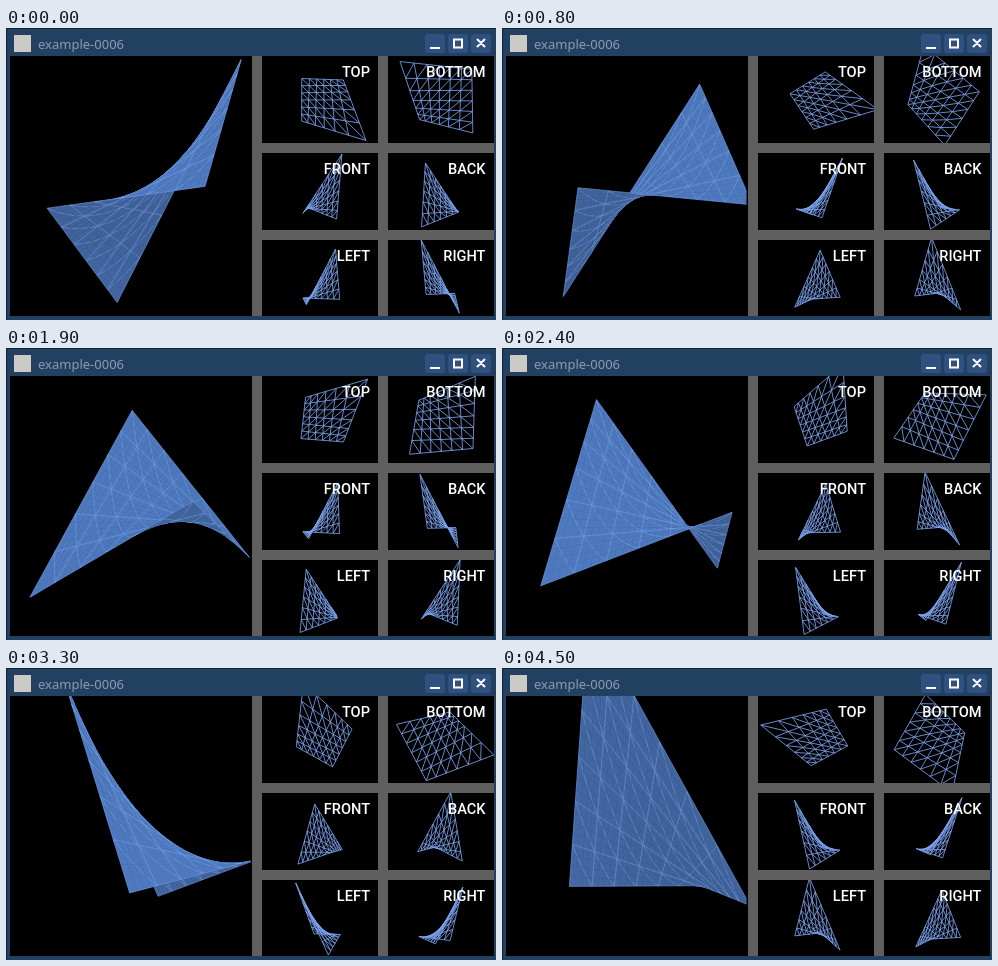
Recreate the animation shown at these times as an HTML page with a canvas. Size 490 by 292 pixels, loop 4.6 s.

```html
<!DOCTYPE html>
<html lang="en">
<head>
<meta charset="utf-8">
<title>example-0006</title>
<style>
  html, body { margin: 0; width: 100%; height: 100%; overflow: hidden; background: #000; }
  canvas, svg { position: absolute; left: 0; top: 0; width: 490px; height: 292px; }
  .title { font: 13px "Noto Sans", sans-serif; fill: #8d9bb1; }
  .labels { font: 500 14.6px Roboto, sans-serif; fill: #fff; text-anchor: end; }
  .sign { fill: none; stroke: #fff; stroke-width: 2; }
</style>
</head>
<body>
<canvas id="stage" width="490" height="292"></canvas>
<svg viewBox="0 0 490 292">
  <path fill="#5f5f5f" d="M246 28h10v260h-10zM372 28h10v260h-10zM256 115h232v10h-232zM256 202h232v10h-232z"/>
  <path fill="#22405f" d="M0 0h490v28h-490zM0 28h4v264h-4zM488 28h2v264h-2zM0 288h490v4h-490z"/>
  <path fill="#10233a" d="M0 0h490v1h-490zM0 0h1v292h-1z"/>
  <rect x="8" y="7" width="17" height="17" fill="#cbcac6"/>
  <text class="title" x="32" y="21">example-0006</text>
  <g fill="#30517f">
    <rect x="419" y="6" width="20" height="19" rx="3"/>
    <rect x="442" y="6" width="20" height="19" rx="3"/>
    <rect x="465" y="6" width="20" height="19" rx="3"/>
  </g>
  <path class="sign" d="M424 20h10M448 11.5h8v8h-8zM471 11l8 8M479 11l-8 8"/>
  <g class="labels">
    <text x="364" y="49">TOP</text><text x="479.5" y="49">BOTTOM</text>
    <text x="364" y="146">FRONT</text><text x="479.5" y="146">BACK</text>
    <text x="364" y="233">LEFT</text><text x="479.5" y="233">RIGHT</text>
  </g>
</svg>
<script>
const LOOP = 4600, STEP = 100, CELLS = 6, FINE = 4;
const ctx = document.getElementById('stage').getContext('2d');
const rad = deg => deg * Math.PI / 180;

// Turn of the sheet: time in ms, angle in degrees
const TURN = [[0, 44], [400, 28], [1300, -12], [2400, -66.5], [3300, -109], [4100, -146], [4500, -166.5]];

// box: clip; c: centre; az, el: camera direction; f: focal length; d: distance
const side = (x, y, w, cx, cy, az) =>
  ({ box: [x, y, w, 77], c: [cx, cy], az, el: 0, f: 128, d: 5.5 });
const MAIN = { box: [4, 28, 240.5, 260], c: [147, 159], az: -66, el: -23.6, f: 458, d: 4.31, lift: 0.42, roll: 0.04 };
const SMALL = [
  { box: [256, 28, 116, 87], c: [317, 71], az: 0, el: 90, f: 148, d: 4 },
  { box: [382, 28, 106, 87], c: [434.5, 71.5], az: 180, el: -90, f: 148, d: 4 },
  side(256, 125, 116, 315.5, 163.5, 0),
  side(382, 125, 106, 435, 163.5, 180),
  side(256, 212, 116, 314.5, 249.5, -90),
  side(382, 212, 106, 435, 249.5, 90)
];

function angleAt(t) {
  let i = 1;
  while (i < TURN.length - 1 && t > TURN[i][0]) i++;
  const [t0, a0] = TURN[i - 1], [t1, a1] = TURN[i];
  return a0 + (a1 - a0) * (t - t0) / (t1 - t0);
}

// Bilinear sheet, one corner raised, pivot slightly off centre
const mix = (u, v, a, b, c, d) =>
  a * u * v + b * u * (1 - v) + c * (1 - u) * (1 - v) + d * (1 - u) * v;
const sheet = (u, v) => [
  mix(u, v, 1.055, 0.05, -0.95, 0),
  v - u,
  mix(u, v, 1.39, -1.33, -0.77, -0.82)
];

function camera(view, turn) {
  const a = rad(turn + view.az), e = rad(view.el);
  const ca = Math.cos(a), sa = Math.sin(a), ce = Math.cos(e), se = Math.sin(e);
  return (u, v) => {
    const [x, y, h] = sheet(u, v), z = h + (view.lift || 0);
    const s = x * sa + y * ca;
    const px = x * ca - y * sa, up = z * ce - s * se, near = s * ce + z * se;
    const k = view.f / (view.d - near);
    return {
      p: [px, up, near],
      x: view.c[0] + k * (px + (view.roll || 0) * up),
      y: view.c[1] - k * up
    };
  };
}

function clipped(view, draw) {
  ctx.save();
  ctx.beginPath();
  ctx.rect(...view.box);
  ctx.clip();
  draw();
  ctx.restore();
}

function trace(...pts) {
  pts.forEach((q, i) => i ? ctx.lineTo(q.x, q.y) : ctx.moveTo(q.x, q.y));
}

function drawWire(view, turn) {
  const at = camera(view, turn), n = CELLS;
  ctx.beginPath();
  for (let i = 0; i <= n; i++) {
    trace(at(i / n, 0), at(i / n, 1));
    trace(at(0, i / n), at(1, i / n));
  }
  for (let i = 0; i < n; i++)
    for (let j = 0; j < n; j++)
      trace(at(i / n, j / n), at((i + 1) / n, (j + 1) / n));
  ctx.lineWidth = 0.85;
  ctx.strokeStyle = '#7aa0ea';
  ctx.stroke();
}

// Soft highlight from a lamp above on the front, even light on the back
function shade(a, b, c) {
  const e = b.p.map((q, i) => q - a.p[i]), f = c.p.map((q, i) => q - a.p[i]);
  const n = [e[1] * f[2] - e[2] * f[1], e[2] * f[0] - e[0] * f[2], e[0] * f[1] - e[1] * f[0]];
  const half = [-0.1 - 0.6 * a.p[0], 0.8, 0.55];
  const dot = n.reduce((sum, q, i) => sum + q * half[i], 0);
  const lit = Math.max(0, dot / (Math.hypot(...n) * Math.hypot(...half) || 1));
  const front = a.p.reduce((sum, q, i) => sum + n[i] * ((i === 2 ? MAIN.d : 0) - q), 0) > 0;
  const k = front ? 0.76 + 0.1 * lit : 0.93;
  const shine = front ? 40 * lit ** 40 : 0;
  return `rgb(${[84, 130, 204].map(q => Math.round(q * k + shine)).join()})`;
}

function drawSolid(view, turn) {
  const at = camera(view, turn), n = CELLS * FINE, grid = [], quads = [];
  for (let i = 0; i <= n; i++) {
    grid[i] = [];
    for (let j = 0; j <= n; j++) grid[i][j] = at(i / n, j / n);
  }
  for (let i = 0; i < n; i++)
    for (let j = 0; j < n; j++) {
      const q = [grid[i][j], grid[i + 1][j], grid[i + 1][j + 1], grid[i][j + 1]];
      quads.push({ i, j, q, near: q.reduce((sum, o) => sum + o.p[2], 0) });
    }
  quads.sort((a, b) => a.near - b.near);
  for (const { i, j, q: [a, b, c, d] } of quads) {
    ctx.beginPath();
    trace(a, b, c, d);
    ctx.closePath();
    ctx.fillStyle = ctx.strokeStyle = shade(a, b, d);
    ctx.lineWidth = 0.6;
    ctx.fill();
    ctx.stroke();

    ctx.beginPath();
    if (i % FINE === 0) trace(a, d);
    if (j % FINE === 0) trace(a, b);
    if ((i + 1) % FINE === 0) trace(b, c);
    if ((j + 1) % FINE === 0) trace(d, c);
    if (i % FINE === j % FINE) trace(a, c);
    ctx.lineWidth = 0.6;
    ctx.strokeStyle = 'rgba(140,180,250,0.6)';
    ctx.stroke();
  }
}

function frame(now) {
  const turn = angleAt(Math.floor(now % LOOP / STEP) * STEP);
  ctx.fillStyle = '#000';
  ctx.fillRect(0, 0, 490, 292);
  clipped(MAIN, () => drawSolid(MAIN, turn));
  for (const view of SMALL) clipped(view, () => drawWire(view, turn));
  requestAnimationFrame(frame);
}
frame(0);
</script>
</body>
</html>
```
